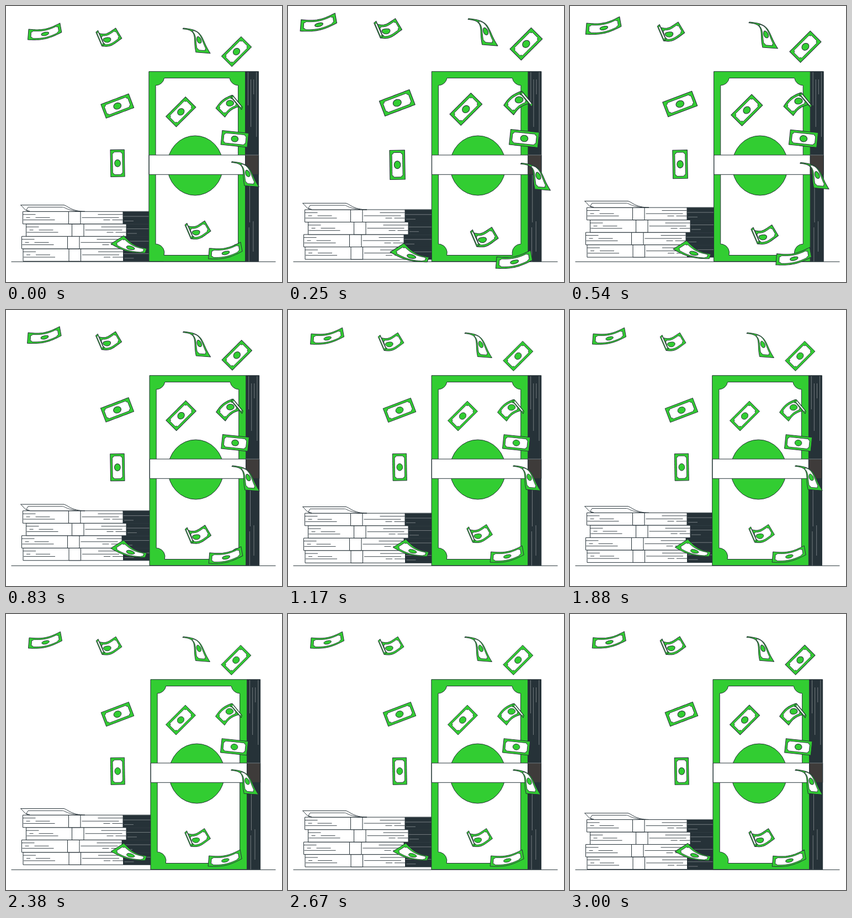
These frames come from a looping animation (500x500 px, 3040 ms). An HTML page with a canvas:

```html
<!DOCTYPE html>
<html lang="en">
<head>
<meta charset="utf-8">
<title>Falling banknotes</title>
<style>
  html, body { margin: 0; width: 100%; height: 100%; overflow: hidden; background: #fff; }
  canvas { display: block; width: 500px; height: 500px; }
</style>
</head>
<body>
<canvas id="stage"></canvas>
<script>
const GREEN = '#32cd32', DARK = '#263238', WHITE = '#fff', GRAY = '#8a9093';
const LOOP = 3040, FPS = 24, LAST = 72;

const canvas = document.getElementById('stage');
const dpr = window.devicePixelRatio || 1;
canvas.width = canvas.height = 500 * dpr;
const ctx = canvas.getContext('2d');

// ---------- drawing helpers ----------
const mix = (a, b, k) => a + (b - a) * k;

function paint(fill, stroke = DARK, width = 1) {
  if (fill) { ctx.fillStyle = fill; ctx.fill(); }
  ctx.strokeStyle = stroke;
  ctx.lineWidth = width;
  ctx.stroke();
}

function box(x0, y0, x1, y1, fill) {
  ctx.beginPath();
  ctx.rect(x0, y0, x1 - x0, y1 - y0);
  paint(fill);
}

function line(x0, y0, x1, y1, color = DARK, width = .9) {
  ctx.beginPath();
  ctx.moveTo(x0, y0);
  ctx.lineTo(x1, y1);
  paint(null, color, width);
}

function poly(points, fill, width) {
  ctx.beginPath();
  points.forEach(p => ctx.lineTo(p[0], p[1]));
  ctx.closePath();
  paint(fill, DARK, width);
}

// ---------- motion: evenly spaced key values, linear between ----------
const BEAT = [1, 1.1, 1.05, 1, 1, 1.1, 1, 1, 1, 1, 1];
const FLOAT = [0, -10, 0];
const SHAKE = [0, -1, 2, -4, 4, -4, 4, -4, 2, -1, 0];

function track(keys, k) {
  const p = k * (keys.length - 1), i = Math.floor(p);
  return mix(keys[i], keys[i + 1], p - i);
}

// ---------- banknotes ----------
// Four corners spanned as a sheet, bent across its long axis
function sheet(a, b, c, d, arc = 0, wave = 0) {
  const ax = b[0] + c[0] - a[0] - d[0], ay = b[1] + c[1] - a[1] - d[1];
  const len = Math.hypot(ax, ay);
  return (u, v) => {
    const bend = (arc * Math.sin(Math.PI * u) + wave * Math.sin(2 * Math.PI * u)) / len;
    return [
      mix(mix(a[0], b[0], u), mix(d[0], c[0], u), v) - ay * bend,
      mix(mix(a[1], b[1], u), mix(d[1], c[1], u), v) + ax * bend
    ];
  };
}

function flat(cx, cy, w, h, deg) {
  const a = deg * Math.PI / 180, c = Math.cos(a), s = Math.sin(a);
  const at = (x, y) => [cx + x * c - y * s, cy + x * s + y * c];
  w /= 2;
  h /= 2;
  return sheet(at(-w, -h), at(w, -h), at(w, h), at(-w, h));
}

// Points on a circle or part of it, in sheet space
function arcPoints(u, v, ru, rv, from, sweep, steps) {
  return Array.from({ length: steps + 1 }, (_, i) => {
    const a = (from + sweep * i / steps) * Math.PI / 180;
    return [u + ru * Math.cos(a), v + rv * Math.sin(a)];
  });
}

// Subdivides a closed outline so that it follows the bend
function follow(at, outline) {
  return outline.flatMap((p, i) => {
    const q = outline[(i + 1) % outline.length];
    const n = Math.ceil(Math.abs(q[0] - p[0]) * 20) || 1;
    return Array.from({ length: n }, (_, k) => at(mix(p[0], q[0], k / n), mix(p[1], q[1], k / n)));
  });
}

function note(at, { left = .08, mid = .5, ru = .13, rv = .21, notch = .055 } = {}) {
  const right = .92, top = .145, low = 1 - top;
  const frame = [[left, top], [right, top], [right, low], [left, low]]
    .flatMap(([u, v], i) => arcPoints(u, v, notch, .11, 90 + i * 90, -90, 6));
  poly(follow(at, [[0, 0], [1, 0], [1, 1], [0, 1]]), GREEN);
  poly(follow(at, frame), WHITE, .9);
  poly(follow(at, arcPoints(mid, .5, ru, rv, 0, 360, 32)), GREEN);
}

function curl(...corners) {
  const at = sheet(...corners);
  poly(corners, GREEN);
  poly([at(.28, .1), at(.85, .1), at(.85, .9), at(.28, .9)], WHITE, .7);
}

function bentNote() {
  note(sheet([42, 43], [98.5, 32], [101.5, 48.5], [40.5, 62], 5.2), { ru: .115, rv: .17 });
}

function waveNote() {
  note(sheet([321, 41], [369.5, 86.5], [343.5, 84.5], [320, 42.5], -11.5, -3),
       { left: .26, mid: .6, ru: .1, rv: .24 });
}

function rolledNote() {
  note(sheet([167.5, 50], [199, 41], [210, 59.5], [174.5, 73.5], 4.7, .8),
       { left: .1, mid: .33, ru: .19, rv: .19, notch: .07 });
  curl([163.3, 48.5], [167, 45.3], [178.3, 71], [174, 73.5]);
}

function foldedNote() {
  note(sheet([379.5, 185.5], [408.5, 162], [423, 182], [396, 201.5], -3.7),
       { left: .11, mid: .68, ru: .18, rv: .23, notch: .07 });
  curl([406.5, 165.5], [410, 162], [427.5, 183.5], [426, 188]);
}

function twice(shape, dx, dy) {
  shape();
  ctx.save();
  ctx.translate(dx, dy);
  shape();
  ctx.restore();
}

function notes() {
  note(flat(416.8, 83.4, 50, 26.4, -45));
  note(flat(316.5, 192, 50, 26.4, -45));
  note(flat(202, 181.5, 53.6, 26.8, -20.8));
  note(flat(202.3, 284.7, 48.7, 25.2, 89));
  foldedNote();
  note(flat(413.6, 240.8, 47.8, 25.4, 6));
  note(sheet([213.5, 415.3], [255, 438.5], [252, 446.5], [190.3, 430], 5.2));
  twice(bentNote, 325.7, 395);
  twice(waveNote, 87.7, 240.7);
  twice(rolledNote, 160.5, 347.5);
}

// ---------- stack of bundles ----------
function dashes(x, y, pattern) {
  ctx.setLineDash(pattern);
  line(x, y, x + pattern.reduce((a, b) => a + b), y);
  ctx.setLineDash([]);
}

function brick(x, y) {
  const end = x + 181.5, low = y + 22.5;
  box(end, y, 285, low, DARK);
  line(end, y, 285, y, '#5a6468', .8);
  line(end, y + 8.8, 285, y + 8.8, GRAY, .8);
  line(end + 2, y + 17.2, end + 19, y + 17.2, GRAY, .8);
  box(x, y, end, low, WHITE);
  dashes(x, y + 5.4, [23, 113, 45, 9]);
  dashes(x + 6, y + 11, [7, 10, 26, 58, 67, 9]);
  dashes(x + 1, y + 15.2, [57, 88, 12, 4, 19, 9]);
  box(x + 83, y, x + 104.5, low, WHITE);
}

function stack() {
  [31, 28.5, 36.5, 30.5].forEach((x, i) => brick(x, 440 - 22.5 * i));
  ctx.beginPath();
  ctx.moveTo(26.5, 360.8);
  ctx.lineTo(105, 360.8);
  ctx.bezierCurveTo(113, 363, 118, 372, 143, 372.5);
  ctx.lineTo(44, 372.5);
  ctx.bezierCurveTo(34, 372, 33, 366, 26.5, 360.8);
  paint(WHITE);
  ctx.beginPath();
  ctx.moveTo(43, 372);
  ctx.quadraticCurveTo(38, 371, 37, 369.5);
  ctx.lineTo(40, 364.6);
  ctx.lineTo(102.5, 364.6);
  ctx.bezierCurveTo(108, 365, 108, 369.5, 131, 372.3);
  paint(null, DARK, .9);
}

// ---------- upright bundle ----------
function bundle() {
  const x0 = 259, x1 = 433.7, x2 = 457.7, y0 = 118.7, y1 = 462.8;
  box(x1, y0, x2, y1, DARK);
  for (let i = 0; i < 4; i++) {
    const x = 438.6 + 5.1 * i;
    line(x, 120 + 15 * Math.sin(i * 1.05), x, i % 2 ? 210 + 9 * i : 180 - 10 * i, GRAY, .8);
  }
  line(441.5, 306, 441.5, 392, GRAY, .8);
  line(440.3, 401, 440.3, y1, GRAY, .8);
  line(448, 390, 448, 445, GRAY, .8);
  box(x0, y0, x1, y1, GREEN);

  const l = x0 + 12.2, r = x1 - 13, t = y0 + 11.8, b = y1 - 11.3;
  const q = Math.PI / 2, R = 15.8, tilt = Math.asin(2.5 / R), low = Math.asin(4.5 / R);
  ctx.beginPath();
  ctx.arc(l, t - 2.5, R, q, tilt, true);
  ctx.arc(r, t - 2.5, R, Math.PI - tilt, q, true);
  ctx.arc(r, b - 4.5, R, -q, Math.PI - low, true);
  ctx.arc(l, b - 4.5, R, low, -q, true);
  ctx.closePath();
  paint(WHITE);

  ctx.beginPath();
  ctx.ellipse(342.7, 289, 50.5, 54, 0, 0, Math.PI * 2);
  paint(GREEN);
  box(x0 + .4, 270, x1, 305.3, WHITE);
  box(x1, 270, x2, 305.3, '#3e3b3a');
  line(x1, 270, x2, 270, GRAY, .8);
}

// ---------- frame ----------
function layer(dx, dy, shape) {
  ctx.save();
  ctx.translate(dx, dy);
  shape();
  ctx.restore();
}

function draw(ms) {
  const n = Math.min(LAST, Math.floor((ms % LOOP + 4) * FPS / 1000));
  const phase = 14 + n * 1000 / FPS * .9965;
  const slow = phase % 3000 / 3000, fast = phase % 1500 / 1500;

  ctx.setTransform(dpr, 0, 0, dpr, 0, 0);
  ctx.lineJoin = 'round';
  ctx.fillStyle = WHITE;
  ctx.fillRect(0, 0, 500, 500);
  line(9.5, 463.3, 488.5, 463.3, DARK, 1);

  layer(0, track(FLOAT, fast), stack);
  layer(track(SHAKE, fast), 0, bundle);

  const s = track(BEAT, slow);
  ctx.translate(250, 250);
  ctx.scale(s, s);
  layer(-250, -250, notes);
}

const start = performance.now();
function tick() {
  draw(performance.now() - start);
  requestAnimationFrame(tick);
}
tick();
</script>
</body>
</html>
```
